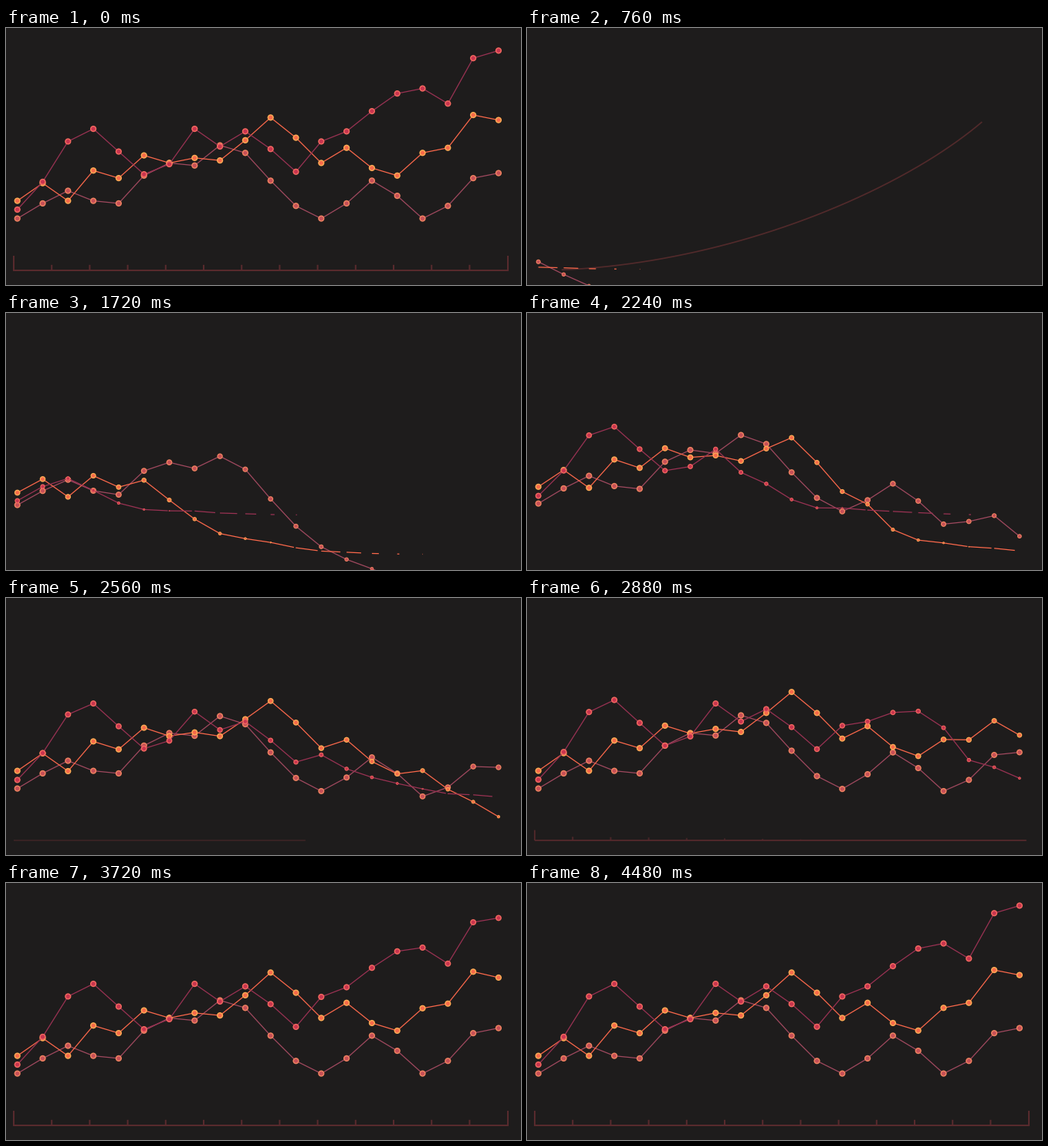
Write a matplotlib script that moves like this. It is 667 by 334 pixels and loops after 5.52 s.

```python
import numpy as np
import matplotlib.pyplot as plt
from matplotlib.animation import FuncAnimation
from matplotlib.collections import LineCollection

W, H, DPI = 667, 334, 100
STEP, FRAMES = 40, 138
PX = 72 / DPI
UNIT = 3.28          # one data unit in pixels
STAGGER = 80         # delay between neighbouring points, ms
N = 20
BG, AXIS = "#1e1c1c", "#582a2d"


def bezier_ease(x1, y1, x2, y2):
    s = np.linspace(0, 1, 400)
    a, b, c = 3 * (1 - s) ** 2 * s, 3 * (1 - s) * s ** 2, s ** 3
    xs, ys = a * x1 + b * x2 + c, a * y1 + b * y2 + c
    return lambda p: np.interp(p, xs, ys)


rise_ease = bezier_ease(.637, 0, .02, 1)
draw_ease = bezier_ease(.437, .08, .103, .96)


def ramp(t, start, length):
    return np.clip((t - start) / length, 0, 1)


def out(p, power):
    return 1 - (1 - p) ** power


fig = plt.figure(figsize=(W / DPI, H / DPI), dpi=DPI, facecolor=BG)
ax = fig.add_axes([0, 0, 1, 1])
ax.set_xlim(0, W)
ax.set_ylim(H, 0)
ax.axis("off")

X = 14.7 + 10 * UNIT * np.arange(N)


class Series:
    def __init__(self, first, steps, rest, start, line, fill, ring, z):
        self.goal = first - UNIT * np.cumsum([0] + steps)
        self.rest = rest
        self.start = start
        self.lines = LineCollection([], colors=line, linewidths=1.25 * PX,
                                    capstyle="butt", zorder=z)
        self.lines.set_snap(False)
        ax.add_collection(self.lines)
        self.dots = ax.scatter(X, self.goal, facecolors=fill,
                               edgecolors=ring, zorder=z + .5)
        self.dots.set_snap(False)

    def update(self, t):
        age = t - self.start - STAGGER * np.arange(N)
        y = self.rest + (self.goal - self.rest) * rise_ease(ramp(age, 0, 2250))
        part = draw_ease(ramp(age, 0, 800))
        pts = np.column_stack([X, y])
        ends = pts[:-1] + (pts[1:] - pts[:-1]) * part[:-1, None]
        self.lines.set_segments([s for s, p in
                                 zip(np.stack([pts[:-1], ends], 1), part)
                                 if p > 0])
        size = 1 - 2 ** (-10 * ramp(age, 410, 2250))
        self.dots.set_offsets(pts)
        self.dots.set_sizes((2 * 3.35 * PX * size) ** 2)
        self.dots.set_linewidths(1.5 * PX * size)


series = [
    Series(247.6, [6, 5, -4, -1, 11, 5, -1, 8, -3, -11, -10, -5, 6, 9, -6,
                   -9, 5, 11, 2],
           365, -85, "#a1495f", "#c74f57", "#ee8260", 3),
    Series(224.6, [7, -7, 12, -3, 9, -3, 2, -1, 8, 9, -8, -10, 6, -8, -3,
                   9, 2, 13, -2],
           313.5, 400, "#fb684b", "#f8694a", "#ffab54", 4),
    Series(236, [11, 16, 5, -9, -9, 4, 14, -7, 6, -7, -9, 12, 4, 8, 7, 2,
                 -6, 18, 3],
           262.4, 760, "#9a3253", "#c9344f", "#f2685f", 5),
]

# Swoosh curve, sampled by arc length
s = np.linspace(0, 1, 600)[:, None]
path = ((1 - s) ** 3 * [10, 315] + 3 * (1 - s) ** 2 * s * [330, 315]
        + 3 * (1 - s) * s ** 2 * [656, 130] + s ** 3 * [656, 20])
dist = np.append(0, np.cumsum(np.hypot(*np.diff(path, axis=0).T)))
dist /= dist[-1]
swoosh, = ax.plot([], [], color="#522a2b", lw=1.7 * PX,
                  solid_capstyle="butt", zorder=1)

# Axis with brackets at both ends
base, = ax.plot([], [], color=AXIS, solid_capstyle="butt", zorder=2,
                snap=False)
K = np.arange(14)
TICK_X = 10 + 15 * UNIT * K
TICK_X[-1] = 650
TICK_H = np.where((K == 0) | (K == 13), 19, 7.2)
ticks = LineCollection([], linewidths=2 * PX, colors=AXIS,
                       capstyle="butt", zorder=2)
ticks.set_snap(False)
ax.add_collection(ticks)


def update_swoosh(t):
    p = ramp(t, 400, 1000)
    tail, head = p ** 3, out(p, 4)
    if 0 < p < 1:
        q = np.linspace(tail, head, 200)
        swoosh.set_data(np.interp(q, dist, path[:, 0]),
                        np.interp(q, dist, path[:, 1]))
    else:
        swoosh.set_data([], [])


def update_axis(t):
    p = ramp(t, 2440, 600)
    if p > 0:
        left = 9 if p == 1 else 10
        right = 10 + 640 * out(p, 4) + (p == 1)
        base.set_data([left, right], [315, 315])
    else:
        base.set_data([], [])
    base.set_linewidth(2 * PX * np.sqrt(p))
    grow = out(ramp(t, 2560 + 36 * K, 700), 2)
    shown = grow > 0
    ticks.set_segments([[(x, 315), (x, 315 - h)] for x, h in
                        zip(TICK_X[shown], (TICK_H * grow)[shown])])
    ticks.set_alpha(None)
    rgb = plt.matplotlib.colors.to_rgb(AXIS)
    ticks.set_color([(*rgb, .4 + .6 * g) for g in grow[shown]])


def update(i):
    # The loop opens on the finished chart
    t = i * STEP if i else FRAMES * STEP
    for one in series:
        one.update(t)
    update_swoosh(t)
    update_axis(t)
    return []


anim = FuncAnimation(fig, update, frames=FRAMES, interval=STEP,
                     init_func=lambda: update(0), repeat=True,
                     repeat_delay=0, blit=False)
plt.show()
```
